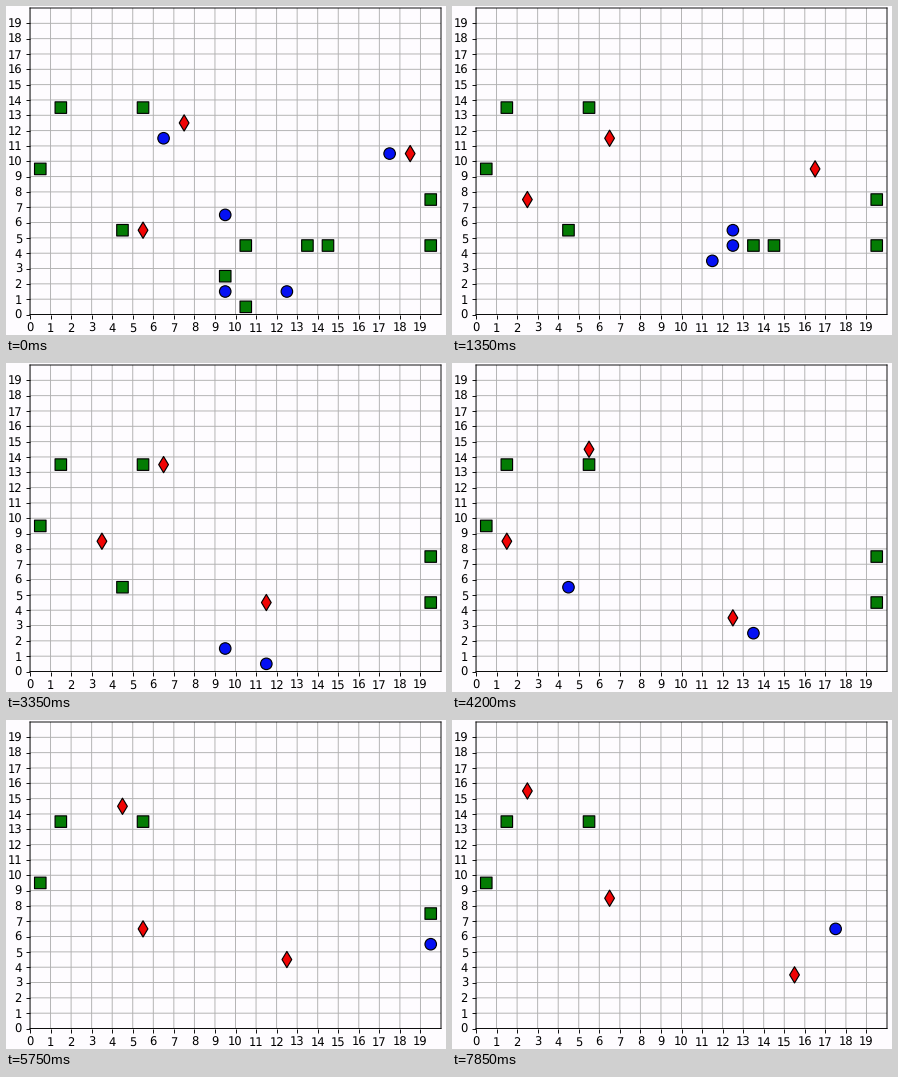
A matplotlib script for the animation above (8 s loop, 440x329 px).

```python
import random

import matplotlib.pyplot as plt
from matplotlib.animation import FuncAnimation

W, H, DPI = 440, 329, 100
SIZE = 20
FRAMES, INTERVAL = 160, 50
SCALE = 0.8286
PAPER = "#fefcff"

# Soft, unsnapped lines and unhinted digits.
plt.rcParams.update({"path.snap": False, "text.hinting": "none",
                     "font.family": "DejaVu Sans"})

# Pauses (first tick, length); everything may move at other ticks.
PAUSES = [(16, 2), (24, 3), (35, 4), (44, 2), (48, 2), (94, 4),
          (113, 2), (125, 5), (133, 2), (145, 5), (158, 2)]
STILL = {t for start, n in PAUSES for t in range(start, start + n)}

FOOD = [(1, 13), (5, 13), (0, 9), (4, 5), (10, 4), (13, 4), (14, 4),
        (9, 2), (10, 0), (19, 7), (19, 4)]

# Hunters share the ticks at which they pass their waypoints.
HUNT_TICKS = [0, 27, 46, 67, 102, 130, 157]
HUNTERS = [
    [(7, 12), (6, 11), (5, 12), (6, 13), (5, 14), (4, 14), (2, 15)],
    [(5, 5), (2, 7), (2, 8), (3, 8), (4, 6), (6, 7), (6, 8)],
    [(18, 10), (16, 9), (13, 6), (11, 4), (12, 3), (13, 5), (15, 3)],
]

# Grazers map tick -> cell, eat the food at their waypoints and vanish
# at the last one.
GRAZERS = [
    {0: (6, 11), 3: (6, 11)},
    {0: (17, 10), 4: (17, 10)},
    {0: (9, 6), 6: (10, 4), 27: (12, 5), 30: (13, 4), 41: (14, 4)},
    {0: (9, 1), 2: (9, 2), 8: (10, 0), 27: (11, 3), 34: (11, 2)},
    {0: (12, 1), 27: (12, 4), 46: (12, 3), 67: (11, 0), 102: (16, 4),
     108: (19, 4), 122: (19, 7), 130: (19, 5), FRAMES: (17, 7)},
    {67: (9, 1), 80: (4, 5), 101: (4, 6)},
]


def distance(a, b):
    return max(abs(a[0] - b[0]), abs(a[1] - b[1]))


def next_cell(cell, goal, left, rng):
    """Step to a neighbour near the straight line that can still reach goal."""
    ideal = [c + (g - c) / (left + 1) for c, g in zip(cell, goal)]
    near = [(cell[0] + dx, cell[1] + dy)
            for dx in (-1, 0, 1) for dy in (-1, 0, 1)]
    choices = [c for c in near if 0 <= min(c) and max(c) < SIZE
               and distance(c, goal) <= left]
    return min(choices, key=lambda c: distance(c, ideal) + 1.2 * rng.random())


def walk(points, seed):
    """Map each tick to a cell along a random walk through the waypoints."""
    rng = random.Random(seed)
    ticks = sorted(points)
    cell = points[ticks[0]]
    path = {ticks[0]: cell}
    for start, end in zip(ticks, ticks[1:]):
        span = range(start + 1, end + 1)
        left = sum(t not in STILL for t in span)
        for t in span:
            if t not in STILL:
                left -= 1
                cell = next_cell(cell, points[end], left, rng)
            path[t] = cell
    return path


hunter_paths = [walk(dict(zip(HUNT_TICKS, cells)), seed)
                for seed, cells in enumerate(HUNTERS)]
grazer_paths = [walk(points, seed) for seed, points in enumerate(GRAZERS)]
eaten = {cell: t for points in GRAZERS for t, cell in points.items()}

fig = plt.figure(figsize=(W / DPI, H / DPI), dpi=DPI, facecolor=PAPER)
ax = fig.add_axes([24 / W, 20.5 / H, 411 / W, 306.5 / H], facecolor=PAPER)
ax.set(xlim=(0, SIZE), ylim=(0, SIZE), xticks=range(SIZE), yticks=range(SIZE))
ax.grid(True, color="#b0b0b0", linewidth=0.8 * SCALE)
ax.tick_params(labelsize=10 * SCALE, length=3.5 * SCALE, width=0.8 * SCALE,
               pad=3.5 * SCALE)
for spine in ax.spines.values():
    spine.set_linewidth(0.8 * SCALE)


def markers(shape, color, z):
    # Two edge entries keep the markers at subpixel positions.
    return ax.scatter([], [], s=(10 * SCALE) ** 2, marker=shape,
                      facecolors=color, edgecolors=["black", "black"],
                      linewidths=SCALE, zorder=z)


food = markers("s", "#047c04", 3)
grazers = markers("o", "#0410f4", 4)
hunters = markers("d", "#f00404", 5)


def place(artist, cells):
    artist.set_offsets([(x + 0.5, y + 0.5) for x, y in cells])


def draw(t):
    place(food, [cell for cell in FOOD if t < eaten.get(cell, FRAMES)])
    place(grazers, [p[t] for p in grazer_paths if min(p) <= t < max(p)])
    place(hunters, [p[min(t, max(p))] for p in hunter_paths])
    return food, grazers, hunters


anim = FuncAnimation(fig, draw, frames=FRAMES, interval=INTERVAL,
                     init_func=lambda: draw(0), repeat=True)
plt.show()
```
